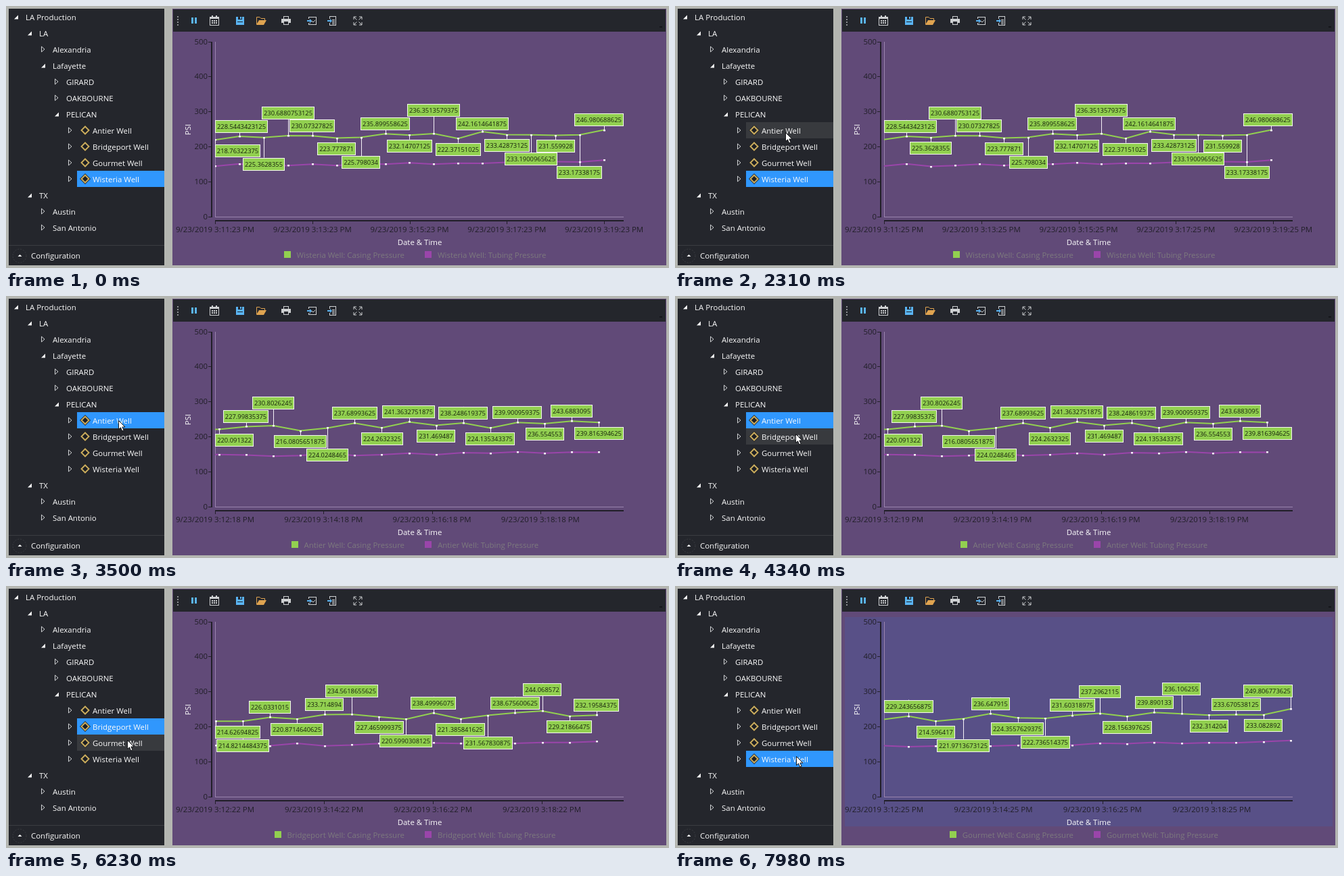
An HTML page with a canvas for the animation above (8000 ms loop, 980x388 px).

```html
<!DOCTYPE html>
<html lang="en">
<head>
<meta charset="utf-8">
<title>Well pressure trend</title>
<style>
  html, body { margin: 0; width: 100%; height: 100%; overflow: hidden; background: #b4b6b1; }
  canvas { display: block; }
</style>
</head>
<body>
<canvas id="stage" width="980" height="388"></canvas>
<script>
const ctx = document.getElementById('stage').getContext('2d');
const LOOP = 8000;
const PLOT = { left: 309, right: 913, top: 52.5, bottom: 311.5 };
const DARK = '#24262c', PURPLE = '#614a78', GREEN = '#92d050', VIOLET = '#9a45aa', WHITE = '#fafafa';
const BLUE = '#5ab4f5', ORANGE = '#dfa350', PALE = '#cfd1d3', GOLD = '#c9ab5c', INK = '#211f28';

// Points are 30 s (one gap) apart; lastX is the newest point's place when the chart is shown.
// settle is how long the loading veil takes to clear. captions are the readings on the labels.
const wells = [
  { name: 'Wisteria', row: 10, clicked: 0, shown: 0, settle: 0, minute: 11, second: 23, lastX: 884, gap: 35.94,
    captions: '218.76322375 228.5443423125 225.3628355 230.6880753125 230.07327825 223.777871 225.798034 235.899558625 232.14707125 236.3513579375 222.37151025 242.1614641875 233.42873125 233.1900965625 231.559928 233.17338175 246.980688625' },
  { name: 'Antier', row: 7, clicked: 2730, shown: 3000, settle: 300, minute: 12, second: 15, lastX: 876.7, gap: 40.07,
    captions: '220.091322 227.99835375 230.8026245 216.0805651875 224.0248465 237.68993625 224.2632325 241.3632751875 231.469487 238.248619375 224.135343375 239.900959375 236.554553 243.6883095 239.816394625' },
  { name: 'Bridgeport', row: 8, clicked: 4760, shown: 4990, settle: 60, minute: 12, second: 17, lastX: 874.7, gap: 40.25,
    captions: '214.62694825 214.8214484375 226.0331015 220.8714640625 233.714894 234.5618655625 227.465999375 220.5990308125 238.49996075 221.385841625 231.567830875 238.675600625 244.068572 229.21866475 232.19584375' },
  { name: 'Gourmet', row: 9, clicked: 6540, shown: 6900, settle: Infinity, minute: 12, second: 18, lastX: 911.5, gap: 40.35,
    captions: '229.243656875 214.596417 221.9713673125 236.647915 224.3557629375 222.736514375 231.60318975 237.2962115 228.156397625 239.890133 236.106255 232.314204 233.670538125 233.082892 249.806773625' }
];
for (const well of wells) well.captions = well.captions.split(' ');
const clicks = [...wells, { row: 10, clicked: 7980 }];

// Tree rows: indent level, kind, caption.
const tree = `0 open LA Production|1 open LA|2 shut Alexandria|2 open Lafayette|3 shut GIRARD|3 shut OAKBOURNE|3 open PELICAN
|4 well Antier Well|4 well Bridgeport Well|4 well Gourmet Well|4 well Wisteria Well|1 open TX|2 shut Austin|2 shut San Antonio`
  .split('|').map(row => row.trim().match(/(\d) (\w+) (.+)/).slice(1));

// Pointer moves: from time, to time, destination.
const moves = [
  [1260, 2250, 163, 187], [2750, 3400, 166, 184], [3780, 4300, 178, 204], [5400, 6160, 179, 228], [7280, 7600, 179, 252]
];

const clamp = (v, lo, hi) => Math.max(lo, Math.min(hi, v));
const smooth = k => k * k * (3 - 2 * k);
const mean = list => list.reduce((sum, v) => sum + v, 0) / list.length;
const random = seed => { const s = Math.sin(seed * 12.9898) * 43758.5453; return s - Math.floor(s); };
const valueY = v => PLOT.bottom - v * (PLOT.bottom - PLOT.top) / 500;

function rect(x, y, w, h, color) {
  ctx.fillStyle = color;
  ctx.fillRect(x, y, w, h);
}

function frame(x, y, w, h, color) {
  ctx.strokeStyle = color;
  ctx.lineWidth = 1;
  ctx.strokeRect(x + 0.5, y + 0.5, w - 1, h - 1);
}

function text(str, x, y, color, align = 'left', size = 11.45) {
  ctx.font = size + 'px "Open Sans", sans-serif';
  ctx.textAlign = align;
  ctx.fillStyle = color;
  ctx.fillText(str, x, y + size * 0.36);
}

function path(points, { stroke, fill, width = 1, close = false }) {
  ctx.beginPath();
  points.forEach(([x, y]) => ctx.lineTo(x, y));
  if (close || fill) ctx.closePath();
  if (fill) { ctx.fillStyle = fill; ctx.fill(); }
  if (stroke) { ctx.strokeStyle = stroke; ctx.lineWidth = width; ctx.stroke(); }
}

const diamond = (x, y, r, style) => path([[x, y - r], [x + r, y], [x, y + r], [x - r, y]], { close: true, ...style });

function cursorAt(t) {
  if (t < moves[0][0]) return null;
  let x = -14, y = 215;
  for (const [from, to, toX, toY] of moves) {
    const k = smooth(clamp((t - from) / (to - from), 0, 1));
    x += (toX - x) * k;
    y += (toY - y) * k;
  }
  return { x: Math.round(x), y: Math.round(y) };
}

function drawTree(t, cursor) {
  rect(4, 4, 230, 380, DARK);
  const selected = clicks.filter(c => c.clicked <= t).pop().row;
  const hovered = cursor && cursor.x >= 105 ? Math.floor((cursor.y - 4) / 24) : -1;
  tree.forEach(([level, kind, caption], i) => {
    const y = 16 + 24 * i, x = 15 + 20 * level;
    if (i === selected) rect(105, y - 12, 129, 24, '#3097fd');
    else if (i === hovered) rect(105, y - 12, 129, 24, '#383a3e');
    if (kind === 'open') path([[x + 3, y - 2.5], [x + 3, y + 3.5], [x - 3, y + 3.5]], { fill: WHITE });
    else path([[x - 2.5, y - 4], [x + 2, y], [x - 2.5, y + 4]], { stroke: PALE, close: true });
    if (kind === 'well') {
      diamond(117, y, 8, { fill: '#1c1e23' });
      diamond(117, y, 5.5, { stroke: GOLD, width: 2 });
    }
    text(caption, kind === 'well' ? 128 : x + 14, y + 0.7, WHITE);
  });
  rect(4, 354, 230, 1, '#3a3c41');
  ctx.setLineDash([2, 2]);
  ctx.strokeStyle = '#3c3e43';
  ctx.beginPath();
  ctx.arc(20, 370, 10, 0, 7);
  ctx.stroke();
  ctx.setLineDash([]);
  path([[17.5, 371], [20.5, 368], [23.5, 371]], { fill: WHITE });
  text('Configuration', 37, 370, WHITE);
}

function drawToolbar() {
  rect(247, 5, 728, 33, DARK);
  for (let y = 15; y < 30; y += 4) rect(253, y, 2, 2, '#8b8d91');
  for (const x of [274, 279]) rect(x, 17, 3, 9, BLUE);
  // calendar
  frame(301, 16, 14, 13, PALE);
  rect(302, 17, 12, 2, PALE);
  for (const x of [304, 310]) rect(x, 14, 2, 3, PALE);
  for (let i = 0; i < 6; i++) rect(304 + i % 3 * 3, 21 + Math.floor(i / 3) * 3, 2, 2, PALE);
  // save
  rect(340, 16, 12, 12, BLUE);
  rect(343, 16, 6, 4, DARK);
  rect(346, 16, 2, 3, BLUE);
  rect(342, 23, 8, 1, DARK);
  // folder
  path([[370.5, 27], [370.5, 16.5], [375, 16.5], [377, 18.5], [382.5, 18.5], [382.5, 21]], { stroke: ORANGE });
  path([[370, 28], [374, 21], [385, 21], [381, 28]], { fill: ORANGE });
  // printer
  rect(407, 19, 14, 6, PALE);
  frame(410, 15, 8, 5, PALE);
  rect(410, 22, 8, 6, DARK);
  frame(410, 22, 8, 6, PALE);
  // export picture and page
  frame(447, 16, 12, 12, PALE);
  path([[449, 26], [452, 22], [454, 24], [457, 21]], { stroke: PALE });
  frame(478, 15, 10, 14, PALE);
  for (let y = 20; y < 27; y += 2) rect(482, y, 4, 1, PALE);
  for (const x of [445, 475]) {
    rect(x, 19, 6, 6, DARK);
    rect(x, 21, 5, 2, BLUE);
    path([[x + 4, 19], [x + 7, 22], [x + 4, 25]], { fill: BLUE });
  }
  // expand
  for (const sx of [-1, 1]) for (const sy of [-1, 1]) {
    const at = (x, y) => [520 + sx * x, 22 + sy * y];
    path([at(2, 6), at(6, 6), at(6, 2)], { stroke: PALE });
    path([at(1.5, 1.5), at(6, 6)], { stroke: PALE });
  }
  rect(966, 30, 4, 2, '#15161a');
}

function drawAxes(well, t) {
  const { left, right, top, bottom } = PLOT;
  rect(left, 53, 1, 260, '#9a84ae');
  rect(left, 312, right - left, 1, '#9a84ae');
  rect(303, 53, 2, 260, INK);
  rect(left, 317, right - left, 2, INK);
  for (let v = 0; v <= 500; v += 100) {
    const y = Math.round(valueY(v));
    rect(299, y, 5, 1, INK);
    text(v, 298, y, INK, 'right');
  }
  const second = well.second + Math.floor((t - 60) / 1060 + (t < 60));
  for (let x = left, minute = well.minute; x < right; x += 4 * well.gap, minute += 2) {
    rect(Math.round(x), 318, 1, 5, INK);
    text(`9/23/2019 3:${minute}:${second} PM`, x, 331, INK, 'center');
  }
  text('Date & Time', 611.5, 349.5, WHITE, 'center');
  ctx.save();
  ctx.translate(269, 183);
  ctx.rotate(-Math.PI / 2);
  text('PSI', 0, 0, WHITE, 'center');
  ctx.restore();
}

// Peaks and points over the local averages carry their label above the line.
function isAbove(values, i) {
  const around = reach => values.slice(Math.max(0, i - reach), i + reach + 1);
  const v = values[i], peak = v === Math.max(...around(1));
  return peak || (v > mean(around(1)) && v > mean(around(2)));
}

// Puts a label beside its point and moves it away from labels already set.
function labelTop(label, placed) {
  const height = 18, away = label.above ? -1 : 1;
  let top = label.y + (label.above ? -24.2 : 6.4);
  for (const other of [...placed].reverse()) {
    const apart = label.x >= other.x + other.w || other.x >= label.x + label.w;
    if (apart || Math.abs(top - other.top) >= height) continue;
    const depth = height + away * (top - other.top) * -1;
    const depthBack = height - Math.abs(top - other.top);
    top = other.top + (depthBack < 4 && depth > height ? -away : depthBack < 4 ? Math.sign(top - other.top) : away) * 20;
  }
  return top;
}

function drawSeries(well, t) {
  const { left, right } = PLOT, values = well.captions.map(Number), last = values.length - 1;
  const pointX = i => well.lastX - (last - i + (t - well.shown) / 30000) * well.gap;
  // One more point, off the left edge, leads each line in.
  const casing = [219, ...values].map((v, i) => [pointX(i - 1), valueY(v)]);
  const tubing = casing.map(([x], i) => [x, 236 - 5 * i / last + 5 * (random(i + well.row) - 0.5)]);

  ctx.save();
  ctx.beginPath();
  ctx.rect(left, 40, right - left, 280);
  ctx.clip();
  path(tubing, { stroke: VIOLET, width: 2 });
  path(casing, { stroke: GREEN, width: 2 });
  for (const [x, y] of [...casing, ...tubing]) rect(Math.round(x) - 1, Math.round(y) - 1, 3, 2.5, '#f6f2f8');
  ctx.restore();

  const labels = [];
  well.captions.forEach((caption, i) => {
    const [px, y] = casing[i + 1];
    if (px < 307.5) return;
    const w = caption.length * 5.4 + 2.5;
    const label = { caption, px, y, w, x: clamp(px - w / 2, left, right - w), above: isAbove(values, i) };
    label.top = labelTop(label, labels);
    labels.push(label);
  });
  for (const { px, y, top } of labels)
    rect(Math.round(px), Math.min(y, top), 1, Math.abs(top - y), '#f6f2f8');
  for (const { caption, x, w, top } of labels) {
    const bx = Math.round(x), by = Math.round(top), bw = Math.round(w);
    rect(bx, by, bw, 19, GREEN);
    frame(bx, by, bw, 19, '#f4f7ee');
    text(caption, bx + bw / 2, by + 9.5, '#16200c', 'center', 9.4);
  }
}

function drawLegend(well) {
  const gray = '#7d7a7e', casing = well.name + ' Well: Casing Pressure';
  text(casing, 589, 368.5, gray, 'right');
  rect(Math.round(570.5 - ctx.measureText(casing).width), 363, 10, 10, GREEN);
  rect(619, 363, 10, 10, VIOLET);
  text(well.name + ' Well: Tubing Pressure', 638, 368.5, gray);
}

function drawChart(t) {
  const well = wells.filter(w => w.shown <= t).pop();
  const load = wells.filter(w => w.clicked <= t).pop();
  rect(246, 4, 730, 380, PURPLE);
  drawToolbar();
  if (load.clicked) {
    const rise = clamp((t - load.clicked - 40) / 140, 0, 1);
    const fall = clamp((t - load.shown) / load.settle, 0, 1);
    ctx.globalAlpha = rise * (1 - fall);
    rect(251, 46, 721, 310, '#585087');
    ctx.globalAlpha = 1;
  }
  drawAxes(well, t);
  drawSeries(well, t);
  drawLegend(well);
  if (load.clicked && t > load.clicked + 100 && t < load.shown + 230) text('Loading...', 611.5, 199, WHITE, 'center');
}

function drawCursor({ x, y }) {
  const outline = [[0, 0], [0, 13], [3, 10.3], [5.2, 15.5], [7.6, 14.5], [5.4, 9.5], [9.5, 9.5]];
  path(outline.map(([dx, dy]) => [x + dx + 0.5, y + dy + 0.5]), { stroke: '#15161a', fill: '#fff' });
}

const began = performance.now();
function render(now) {
  const t = Math.max(0, now - began) % LOOP;
  const cursor = cursorAt(t);
  rect(0, 0, 980, 388, '#b4b6b1');
  drawTree(t, cursor);
  drawChart(t);
  if (cursor) drawCursor(cursor);
  requestAnimationFrame(render);
}
render(began);
</script>
</body>
</html>
```
